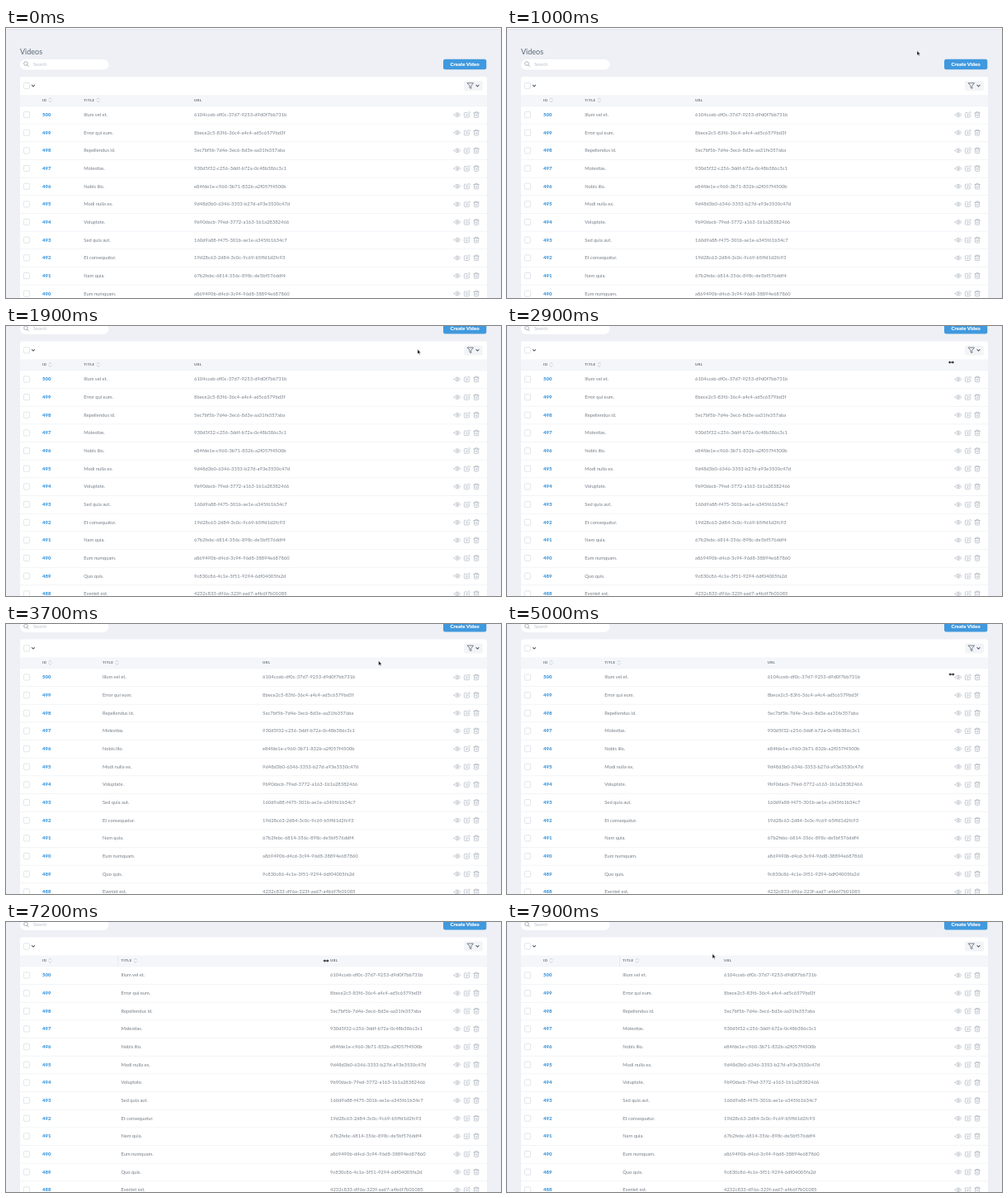
These frames come from a looping animation (600 by 327 pixels, 8000 ms). An HTML page:

```html
<!DOCTYPE html>
<html lang="en">
<head>
<meta charset="utf-8">
<title>Videos</title>
<style>
html, body { margin: 0; width: 100%; height: 100%; overflow: hidden; background: #eef0f5; }
svg { display: block; width: 600px; height: 327px; font: 5.75px Lato, "Open Sans", sans-serif; fill: #757e88; }
.line { fill: none; stroke-linecap: round; stroke-linejoin: round; }
.icon { stroke: #a6afba; stroke-width: .65; }
.box { fill: #fff; stroke: #ccd4de; stroke-width: .6; }
.dark { stroke: #5c6470; stroke-width: 1.1; }
.sort { stroke: #b4bdc9; stroke-width: .65; }
.id { font-weight: 900; font-size: 6px; fill: #4099de; }
.url { letter-spacing: .08px; }
.head { font-weight: 900; font-size: 4.4px; letter-spacing: .3px; fill: #7c858e; }
</style>
</head>
<body>
<svg viewBox="0 0 600 327">
  <defs>
    <rect id="check" class="box" x="21.4" y="-3.6" width="7.2" height="7.2" rx="1.5"/>
    <path id="chevron" class="line dark" d="M-1.6-.8 0 .8 1.6-.8"/>
    <path id="sort" class="line sort" d="M-1.6-1 0-2.6 1.6-1M-1.6 1 0 2.6 1.6 1"/>
    <g id="actions" class="line icon">
      <path d="M543.2 0Q547-5 550.8 0Q547 5 543.2 0Z"/><circle cx="547" r="1.1"/>
      <path d="M558.2-2.6h-1.900q-.9 0-.9.9v3.900q0 .9.900.9h4.200q.9 0 .9-.9v-1.800M557.900.900l.3-1.600 3-3 1.300 1.300-3 3Z"/>
      <path d="M566.9-2.2h6.400M568.700-2.200v-1.200h2.800v1.200M567.500-2.200v4.600q0 .9.900.900h3.400q.9 0 .9-.9v-4.600M569.300-.3v1.900M570.900-.3v1.900"/>
    </g>
  </defs>
  <g id="page">
    <rect width="600" height="1.2" fill="#fff"/>
    <rect y="1.2" width="600" height="1" fill="#dfe3ea"/>
    <text x="17" y="31.7" font-size="9" fill="#5b6572">Videos</text>
    <rect x="17" y="38" width="107.5" height="12.5" rx="6.25" fill="#fff"/>
    <path class="line" d="M27.3 46.5l-1.7-1.8a2.3 2.3 0 1 1 .1-.1" stroke="#8d99a8" stroke-width=".8"/>
    <text x="33" y="46" font-size="5.6" fill="#b9c0c9">Search</text>
    <rect x="530" y="37.7" width="52.3" height="12.5" rx="2.5" fill="#4099de"/>
    <text x="556.2" y="46" text-anchor="middle" font-size="6" font-weight="900" fill="#fff">Create Video</text>
    <rect x="17" y="59" width="566" height="350" rx="3" fill="#fff"/>
    <use href="#check" y="70"/>
    <use href="#chevron" x="33" y="70"/>
    <rect x="555" y="64" width="23" height="12" rx="2.5" fill="#f3f4f7"/>
    <path class="line" d="M559.3 66.7h7.2l-2.7 3.4v3.2l-1.8-1v-2.2Z" stroke="#6c7683" stroke-width=".9"/>
    <use href="#chevron" x="571.5" y="70"/>
    <rect x="17" y="81" width="566" height="13.2" fill="#f4f6fa"/>
    <text class="head" x="44" y="89">ID</text>
    <use href="#sort" x="53.5" y="87.4"/>
    <rect id="hover" x="17" y="94.5" width="566" height="21.2" fill="#f3f9fe"/>
    <g id="rows"></g>
    <g id="titles">
      <rect id="edge" x="-4" y="81" width=".6" height="13.2" fill="#dce2ea"/>
      <text class="head" y="89">TITLE</text>
      <use href="#sort" x="17.5" y="87.4"/>
    </g>
    <g id="urls"><text class="head" y="89">URL</text></g>
  </g>
  <g id="cursor">
    <path id="arrow" d="M0 0v5.8l1.4-1.2.9 2 .9-.4-.9-1.9h1.8Z" fill="#111" stroke="#fff" stroke-width=".5"/>
    <path id="resize" d="M-3.6 0l2.2-2v1.3h2.8V-2l2.2 2-2.2 2V.7h-2.8V2Z" fill="#111" stroke="#fff" stroke-width=".3"/>
  </g>
</svg>
<script>
const $ = id => document.getElementById(id);
const PITCH = 21.66;
const videos = [
  ['Illum vel et.', '6104cceb-df0c-37d7-9253-d9d0f7bb731b'],
  ['Error qui eum.', '8bece2c5-83f6-36c4-a4c4-ad5c6579bd3f'],
  ['Repellendus id.', '5ec7bf5b-7d4e-3ec6-8d3e-aa31fe357aba'],
  ['Molestias.', '930d5f32-c256-3ddf-b72a-0c48b386c3c1'],
  ['Nobis illo.', 'e84fde1e-c960-3b71-832b-a2f057f4500b'],
  ['Modi nulla ex.', '9d48d3b0-6346-3353-b27d-a93e3530c47d'],
  ['Voluptate.', '9b90dacb-79ed-3772-a163-1b1a28382466'],
  ['Sed quia aut.', '160d9a88-f475-301b-ae1e-a345f61b34c7'],
  ['Et consequatur.', '19d28c63-2d84-3c0c-9c69-b5ffd1d2fc93'],
  ['Nam quia.', '67b2febc-6814-356c-898c-de5bf576ddf4'],
  ['Eum numquam.', 'a869490b-d4cd-3c94-96d8-38894e687860'],
  ['Quo quis.', '9c830c86-4c1e-3f51-9294-6df04005fa2d'],
  ['Eveniet est.', '4232c833-d96a-323f-aad7-a4b6f7b01085']
];
const add = (id, html) => $(id).insertAdjacentHTML('beforeend', html);
videos.forEach(([title, url], i) => {
  const y = 105.1 + i * PITCH, base = y + 2;
  add('rows', `<rect x="17" y="${y - 10.9}" width="566" height=".6" fill="#e9edf2"/>
    <use href="#check" y="${y}"/><text class="id" x="44" y="${base}">${500 - i}</text>
    <use href="#actions" y="${y}"/>`);
  add('titles', `<text y="${base}">${title}</text>`);
  add('urls', `<text class="url" y="${base}">${url}</text>`);
});

// Keys are [time, ...values], eased smoothly from one to the next.
function track(keys, t) {
  const n = keys.findIndex(k => k[0] > t);
  if (n === 0) return keys[0].slice(1);
  if (n < 0) return keys[keys.length - 1].slice(1);
  const a = keys[n - 1], b = keys[n];
  const u = (t - a[0]) / (b[0] - a[0]), e = u * u * (3 - 2 * u);
  return a.slice(1).map((v, i) => v + (b[i + 1] - v) * e);
}
const columns = [
  [2900, 94.3, 228], [3600, 117, 311], [4900, 117, 311], [5600, 139.5, 393],
  [7200, 139.5, 393], [7800, 140.3, 263]
];
const pointer = [
  [1800, 497, 27.5], [2600, 538.5, 44], [2900, 538.5, 44], [3600, 452, 44.5],
  [3800, 451, 44.5], [4600, 543, 50], [4900, 543, 60], [5000, 539, 61],
  [5600, 461, 60], [5800, 459, 55], [6200, 459, 55], [6900, 388, 47],
  [7200, 388, 47], [7800, 256, 45], [7900, 249, 38.5]
];
const resizing = [[2500, 3600], [4600, 5600], [6800, 7800]];
const show = (id, on) => $(id).setAttribute('visibility', on ? 'visible' : 'hidden');
const move = (id, x, y) => $(id).setAttribute('transform', `translate(${x} ${y})`);

function draw(t) {
  const u = Math.min(1, Math.max(0, (t - 1100) / 700));
  const scroll = 40.6 * (1 - (1 - u) ** 2);
  const [title, url] = track(columns, t);
  const [x, y] = track(pointer, t);
  const visible = t >= 1000;
  const drag = resizing.some(([a, b]) => t >= a && t < b);
  move('page', 0, -scroll);
  move('titles', title, 0);
  move('urls', url, 0);
  move('cursor', x, y);
  show('arrow', visible && !drag);
  show('resize', visible && drag);
  show('hover', visible && !drag && y + scroll > 94.5 && y + scroll < 115.7);
  show('edge', t >= 6800);
}
function frame(now) {
  draw(now % 8000);
  requestAnimationFrame(frame);
}
requestAnimationFrame(frame);
</script>
</body>
</html>
```
